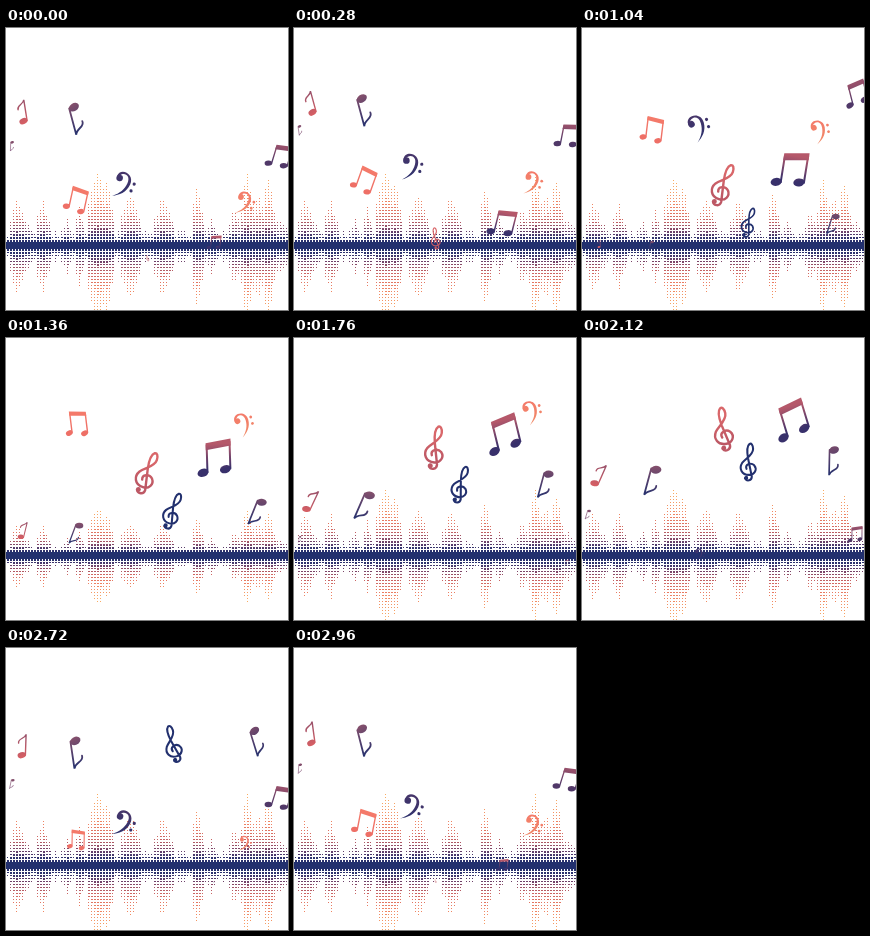
Recreate the animation shown at these times as an HTML page. Size 282x282 px, loop 3 s.

```html
<!DOCTYPE html>
<html lang="en">
<head>
<meta charset="utf-8">
<title>Music wave</title>
<style>
  html, body { margin: 0; width: 100%; height: 100%; overflow: hidden; background: #fff; }
  svg { display: block; width: 100vw; height: 100vh; }
</style>
</head>
<body>
<svg id="stage" viewBox="0 0 282 282">
  <defs id="inks">
    <linearGradient id="waveFill" gradientUnits="userSpaceOnUse" x1="0" x2="0" y1="218" spreadMethod="reflect">
      <stop offset="0" stop-color="#22306e"/>
      <stop offset=".1" stop-color="#2b306d"/>
      <stop offset=".21" stop-color="#7a4468"/>
      <stop offset=".34" stop-color="#cc6462"/>
      <stop offset=".52" stop-color="#ee8062"/>
      <stop offset=".85" stop-color="#f9ac64"/>
    </linearGradient>
  </defs>
  <g fill="none" stroke="url(#waveFill)">
    <path id="fineDots" stroke-width="1" stroke-dasharray="1 2"/>
    <path id="midDots" stroke-width="2" stroke-dasharray="1 2"/>
    <path id="denseDots" stroke-width="2" stroke-dasharray="2 1"/>
  </g>
  <rect y="214" width="282" height="7" fill="#22306e"/>
  <g id="notes"></g>
</svg>
<script>
const LOOP = 3000, STEP = 40, MID = 218, PITCH = 3;
const SVG = 'http://www.w3.org/2000/svg';
const byId = id => document.getElementById(id);

function make(tag, attrs, parent) {
  const el = document.createElementNS(SVG, tag);
  for (const key in attrs) el.setAttribute(key, attrs[key]);
  return parent.appendChild(el);
}

const dot = (x, y, rx, ry = rx) =>
  `<ellipse cx="${x}" cy="${y}" rx="${rx}" ry="${ry}" stroke="none" transform="rotate(-18 ${x} ${y})"/>`;
const line = (d, width) =>
  `<path d="${d}" fill="none" stroke-width="${width}" stroke-linecap="round"/>`;
const shape = d => `<path d="${d}" stroke="none"/>`;

const glyphs = {
  risingBeam: shape('M-8 -14L17 -18V-11L-8 -7Z') + line('M-7 15V-12M16 12V-15', 2) +
    dot(-11.5, 15.5, 5.6, 4) + dot(11, 12.5, 5.6, 4),
  fallingBeam: shape('M-9 -17L15 -14V-8L-9 -11Z') + line('M-8 13V-15M14 16V-12', 2) +
    dot(-12, 13.5, 5, 3.8) + dot(9.5, 16.5, 5, 3.8),
  single: dot(-1.5, 9, 4.2, 3) + line('M2.2 9V-12C1 -7 -6 -8 -5 -3', 1.4),
  treble: line('M-3 8C-5 3 2 0 6 4C10 9 6 15 0 15C-9 15 -12 7 -8 1C-4 -4 5 -8 5 -15' +
    'C5 -20 3 -22 1 -21C-3 -18 -2 -10 -1 -4L3 17C3 22 -3 23 -5 19', 2.4) + dot(-3.6, 18.5, 2.4),
  bass: shape('M-10 -6C-11 -16 5.5 -16 5.5 -4C5.5 5 0 10 -6 14C0 8 2.5 3 2.5 -4C2.5 -13 -6 -13 -8 -7Z') +
    dot(-6.8, -5.5, 3.3) + dot(9, -6, 1.6) + dot(9, 1.5, 1.6)
};

// peak: the time of the strongest clockwise tilt
const notes = [
  { glyph: 'fallingBeam', x: 70.5, from: 235, to: 76, birth: 2110, life: 2600, size: .7, peak: 450, swing: 21, colors: ['#f47a6a', '#ee6f66'] },
  { glyph: 'risingBeam', x: 273, from: 235, to: 62, birth: 1620, life: 2600, size: .68, peak: 2850, swing: 18, colors: ['#96506b', '#503868'] },
  { glyph: 'risingBeam', x: 208, from: 236, to: 79, birth: 2690, life: 2600, size: 1, peak: 560, swing: 17, colors: ['#b5586a', '#38306b'] },
  { glyph: 'treble', x: 141.5, from: 238, to: 81, birth: 2890, life: 2620, size: 1, lean: -4, peak: 1200, swing: 23, colors: ['#d9676a', '#bd5865'] },
  { glyph: 'treble', x: 167, from: 235, to: 92, birth: 440, life: 2500, size: .86, lean: -2, peak: 1400, swing: 18, colors: ['#22306e', '#22306e'] },
  { glyph: 'bass', x: 117.5, from: 242, to: 93, birth: 1750, life: 2600, size: 1, lean: 5, peak: 2750, swing: 23, colors: ['#48366a', '#2b306d'] },
  { glyph: 'bass', x: 238.5, from: 235, to: 74, birth: 2190, life: 2600, size: .88, lean: 4, peak: 2950, swing: 20, colors: ['#f47a6a', '#f08a68'] },
  { glyph: 'single', x: 17.5, from: 235, to: 74, birth: 780, life: 2600, size: 1, lean: 5, peak: 1900, swing: 21, colors: ['#95506a', '#d75f64'] },
  { glyph: 'single', x: 69, from: 235, to: 81, birth: 790, life: 2600, size: 1.3, lean: 184, peak: 1650, swing: 20, colors: ['#22306e', '#85506c'] },
  { glyph: 'single', x: 250, from: 235, to: 90, birth: 480, life: 2450, size: 1.2, lean: 182, peak: 1350, swing: 20, colors: ['#22306e', '#764a6b'] },
  { glyph: 'single', x: 5.5, from: 235, to: 83, birth: 1270, life: 2600, size: .42, lean: 180, peak: 2300, swing: 18, colors: ['#713f6a', '#85506c'] }
];

notes.forEach((note, i) => {
  const id = 'ink' + i;
  const ink = make('linearGradient', { id, gradientUnits: 'userSpaceOnUse', x1: 0, x2: 0, y1: -13, y2: 12 }, byId('inks'));
  note.colors.forEach((color, k) => make('stop', { offset: k, 'stop-color': color }, ink));
  note.el = make('g', { fill: `url(#${id})`, stroke: `url(#${id})` }, byId('notes'));
  note.el.innerHTML = glyphs[note.glyph];
});

// Wave clusters: centre, height, half width
const clusters = [
  [11, 54, 8], [23, 25, 5], [36, 52, 7], [60, 32, 4], [73, 42, 5], [92, 84, 11],
  [101, 68, 7], [123, 57, 10], [157, 54, 10], [191, 67, 6], [205, 30, 6], [228, 46, 5],
  [241, 86, 6], [252, 58, 8], [262, 82, 6], [274, 30, 7]
];

let seed = 11;
const random = () => (seed = seed * 16807 % 2147483647) / 2147483647;

function clusterHeight(x, [center, height, halfWidth]) {
  const offset = Math.abs(x - center) / halfWidth;
  return offset > 1 ? 0 : height * (1 - .5 * offset);
}

const columns = Array.from({ length: 94 }, (_, i) => {
  const x = i * PITCH + 1;
  const peak = Math.max(...clusters.map(c => clusterHeight(x, c)));
  return { x, height: Math.max(10 + 6 * random(), peak * (.8 + .2 * random())) };
});

// Dots stay on a fixed grid; each layer covers a share of the column
function dotPath(width, limit) {
  return columns.map(({ x, height }) => {
    const h = Math.round(limit(height) / PITCH) * PITCH;
    return `M${x + width / 2} ${MID - h}V${MID + h + 1}`;
  }).join('');
}

function drawWave(t) {
  const dip = Math.exp(-Math.pow((t - 1360) / 140, 2));
  const level = .93 + .05 * Math.cos(2 * Math.PI * t / LOOP) - .25 * dip;
  byId('waveFill').setAttribute('y2', MID + 82 * level);
  byId('fineDots').setAttribute('d', dotPath(1, h => h * level));
  byId('midDots').setAttribute('d', dotPath(2, h => h * level * .68));
  byId('denseDots').setAttribute('d', dotPath(2, h => 3 + h * level * .24));
}

function drawNote(note, t) {
  const u = (t - note.birth + LOOP) % LOOP / note.life;
  const visible = u > 0 && u < 1;
  note.el.setAttribute('display', visible ? 'inline' : 'none');
  if (!visible) return;
  const rise = 1.18 * u - .18 * Math.pow(u, 6);
  const y = note.from + (note.to - note.from) * rise;
  const angle = (note.lean || 0) + note.swing * Math.cos(2 * Math.PI * (t - note.peak) / LOOP);
  const scale = note.size * Math.min(1, u / .3);
  note.el.setAttribute('transform', `translate(${note.x} ${y}) rotate(${angle}) scale(${scale})`);
}

const start = performance.now();
function frame() {
  const t = Math.floor((performance.now() - start) % LOOP / STEP) * STEP;
  drawWave(t);
  notes.forEach(note => drawNote(note, t));
  requestAnimationFrame(frame);
}
frame();
</script>
</body>
</html>
```
